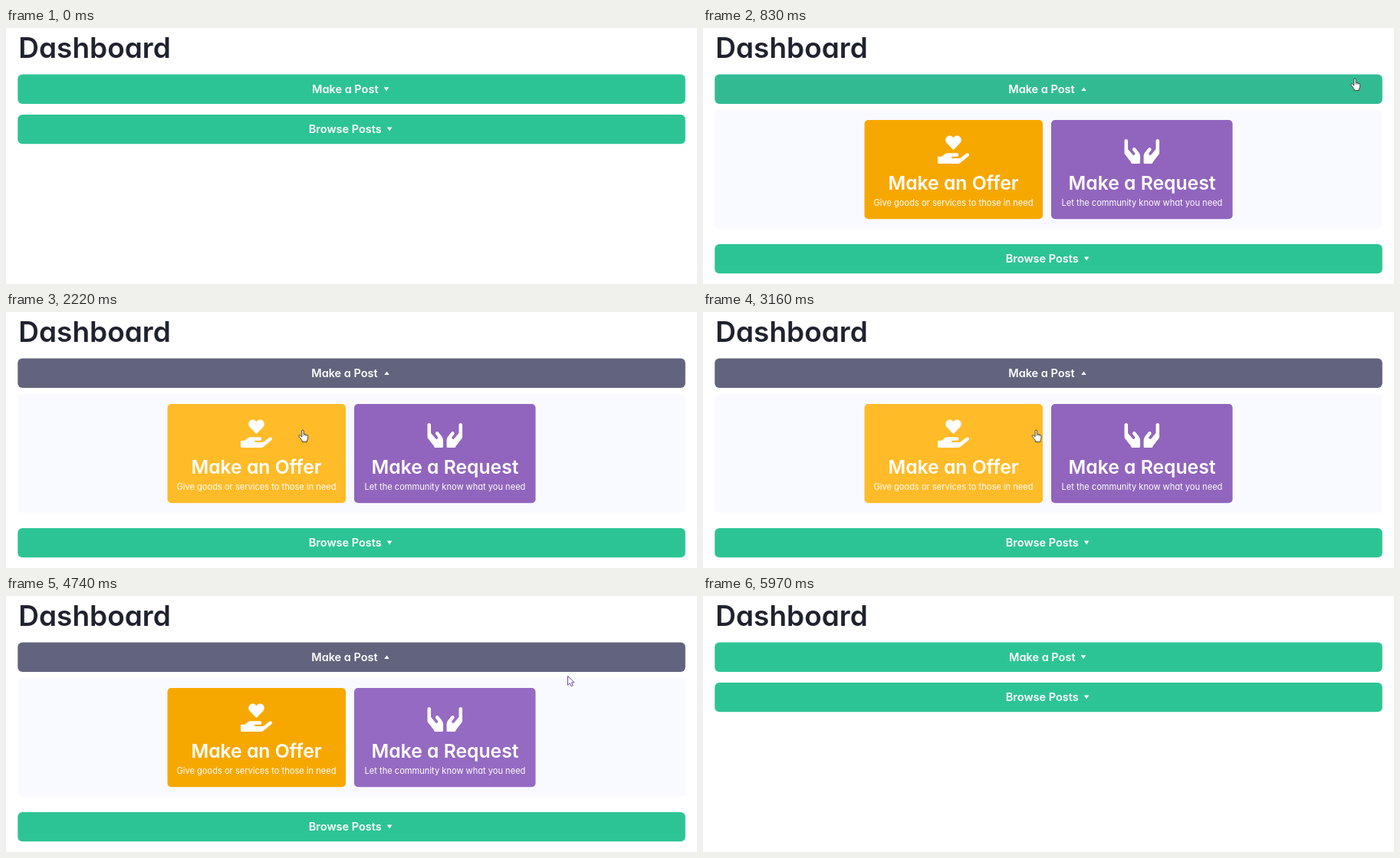
Recreate the animation shown at these times as an HTML page. Size 901x334 px, loop 6.23 s.

```html
<!DOCTYPE html>
<html lang="en">
<head>
<meta charset="utf-8">
<title>Dashboard</title>
<style>
  html, body { margin: 0; width: 100%; height: 100%; overflow: hidden; background: #fff; }
  svg { display: block; width: 901px; height: 334px; }
  text {
    font-family: Inter, "Open Sans", sans-serif;
    font-feature-settings: "cv11";
    font-optical-sizing: none;
    font-weight: 600;
    text-anchor: middle;
    fill: #fff;
  }
  .heading { font-size: 37px; fill: #20232f; }
  .label { font-size: 14.5px; }
  .title { font-size: 24.7px; }
  .note { font-size: 11.1px; font-weight: 400; }
  .icon, .mark { fill: #fff; }
  .bar { fill: #2dc495; }
  .panel { fill: #f9faff; }

  .toggle, .offer, .request, .cursor { animation: 6.23s linear infinite; }
  .open, .closed, .browse, .hand, .arrow { animation: 6.23s step-end infinite; }
  .toggle { animation-name: toggle; }
  .offer { animation-name: offer; }
  .request { animation-name: request; }
  .cursor { animation-name: move; }
  .open { animation-name: open; }
  .closed { animation-name: closed; }
  .browse { animation-name: browse; }
  .hand { animation-name: hand; }
  .arrow { animation-name: arrow; }

  @keyframes toggle {
    0%, 13%, 87%, 100% { fill: #2dc495; }
    16.6%, 83.5% { fill: #62647e; }
  }
  @keyframes offer {
    0%, 30.9%, 55.5%, 100% { fill: #f7a800; }
    35%, 51.4% { fill: #ffbb28; }
  }
  @keyframes request {
    0%, 52.5%, 77%, 100% { fill: #9165bd; }
    57.5%, 73.4% { fill: #a277cf; }
  }
  @keyframes open {
    0%, 84.6%, 100% { opacity: 0; }
    13.2% { opacity: 1; }
  }
  @keyframes closed {
    0%, 84.6%, 100% { opacity: 1; }
    13.2% { opacity: 0; }
  }
  @keyframes browse {
    0%, 84.6%, 100% { transform: none; }
    13.2% { transform: translateY(169px); }
  }
  @keyframes move {
    0%, 5.2% { transform: translate(896px, 56px); animation-timing-function: ease-out; }
    10.8%, 13% { transform: translate(845px, 65px); }
    13.2% { transform: translate(850px, 66px); }
    20.5% { transform: translate(850px, 66px); animation-timing-function: ease-in; }
    26.8% { transform: translate(552px, 99px); animation-timing-function: ease-out; }
    30% { transform: translate(436px, 112px); }
    31% { transform: translate(428px, 122px); animation-timing-function: ease-out; }
    35.5% { transform: translate(387px, 154px); }
    44.5% { transform: translate(387px, 154px); animation-timing-function: ease-in; }
    51.4% { transform: translate(443px, 154px); }
    52.5% { transform: translate(454px, 154px); animation-timing-function: ease-out; }
    58.4% { transform: translate(517px, 156px); }
    65.2% { transform: translate(517px, 156px); animation-timing-function: ease-in; }
    73.4% { transform: translate(690px, 121px); }
    74.9% { transform: translate(715px, 115px); }
    76.1% { transform: translate(732px, 104px); animation-timing-function: ease-out; }
    81%, 100% { transform: translate(751px, 83px); }
  }
  @keyframes hand {
    0%, 26.8%, 51.4%, 73.4%, 95.7%, 100% { opacity: 0; }
    6.4%, 30.9%, 52.5%, 77% { opacity: 1; }
  }
  @keyframes arrow {
    0%, 6.4%, 30.9%, 52.5%, 77%, 100% { opacity: 0; }
    5.2%, 26.8%, 51.4%, 73.4% { opacity: 1; }
  }
</style>
</head>
<body>
<svg viewBox="0 0 901 334">
  <defs>
    <path id="palm" d="M204.8 230.4c-10.6-14.1-30.7-17-44.8-6.4-14.1 10.6-17 30.7-6.4 44.8l38.1 50.8c4.8 6.4 4.1 15.3-1.5 20.9l-12.8 12.8c-6.7 6.7-17.6 6.2-23.6-1.1L64 244.4V96c0-17.7-14.3-32-32-32S0 78.3 0 96v218.4c0 10.9 3.7 21.5 10.5 30l104.1 134.3c5 6.5 8.4 13.9 10.4 21.7 1.8 6.9 8.1 11.6 15.3 11.6H272c8.8 0 16-7.2 16-16V384c0-27.7-9-54.6-25.6-76.8z"/>
  </defs>

  <text class="heading" x="115.5" y="38.7">Dashboard</text>

  <rect class="toggle" x="15.3" y="60.5" width="870.5" height="38.5" rx="6"/>
  <g class="closed">
    <text class="label" x="442.3" y="85">Make a Post</text>
    <path class="mark" d="M492.8 77.3h6.4l-3.2 5z"/>
  </g>

  <g class="open">
    <text class="label" x="441.5" y="85">Make a Post</text>
    <path class="mark" d="M493.3 82h6.4l-3.2-4.4z"/>
    <rect class="panel" x="15" y="107" width="871" height="155" rx="6"/>

    <rect class="offer" x="210.5" y="120" width="232.5" height="129.3" rx="5"/>
    <g class="icon" transform="translate(306 140.5) scale(.0712)">
      <path d="M275.3 250.5c7 7.4 18.4 7.4 25.5 0l108.9-114.2c31.6-33.2 29.8-88.2-5.6-118.8-30.8-26.7-76.7-21.9-104.9 7.7L288 36.9l-11.1-11.6C248.7-4.4 202.8-9.2 172 17.5c-35.3 30.6-37.2 85.6-5.6 118.8z"/>
      <path d="M565.3 328.1c-11.8-10.7-30.2-10-42.6 0L430.3 402c-11.3 9.1-25.4 14-40 14H272c-8.8 0-16-7.2-16-16s7.2-16 16-16h78.3c15.9 0 30.7-10.9 33.3-26.6 3.3-20-12.1-37.4-31.6-37.4H192c-27 0-53.1 9.3-74.1 26.3L71.4 384H16c-8.8 0-16 7.2-16 16v96c0 8.8 7.2 16 16 16h356.8c14.5 0 28.6-4.9 40-14L564 377c15.2-12.1 16.4-35.3 1.3-48.9z"/>
    </g>
    <text class="title" x="326.5" y="211.3">Make an Offer</text>
    <text class="note" x="326.5" y="232.3">Give goods or services to those in need</text>

    <rect class="request" x="454" y="120" width="236.5" height="129.3" rx="5"/>
    <g class="icon" transform="translate(549.5 140.5) scale(.0712)">
      <use href="#palm"/>
      <use href="#palm" transform="translate(640) scale(-1 1)"/>
    </g>
    <text class="title" x="572.5" y="211.3">Make a Request</text>
    <text class="note" x="572.5" y="232.3">Let the community know what you need</text>
  </g>

  <g class="browse">
    <rect class="bar" x="15.3" y="113" width="870.5" height="38.3" rx="6"/>
    <text class="label" x="442.3" y="137">Browse Posts</text>
    <path class="mark" d="M496.9 129.6h6.4l-3.2 5z"/>
  </g>

  <g class="cursor" fill="#fff" stroke-linejoin="round">
    <path class="arrow" stroke="#6b45a8" d="M.5.5v11.7l2.8-2.5 1.9 4 2-.9-1.8-3.9 3.7-.2z"/>
    <g class="hand" stroke="#333" stroke-width=".9">
      <path d="M-1.2 1.2Q-1.2 0 0 0t1.2 1.2v4l1.8.4 1.9.6 1.4.7q.6.5.5 1.6l-.4 3.3-1 2v1.7H-.8v-1.5l-2.6-3.6-1.7-2.3q-.4-1.3.8-1.4 1 0 1.7.9l1.4 1.3z"/>
      <path fill="none" stroke-width=".6" d="M1.2 5.4v2.2M3.2 5.8v2M5 6.4v1.7"/>
    </g>
  </g>
</svg>
</body>
</html>
```
